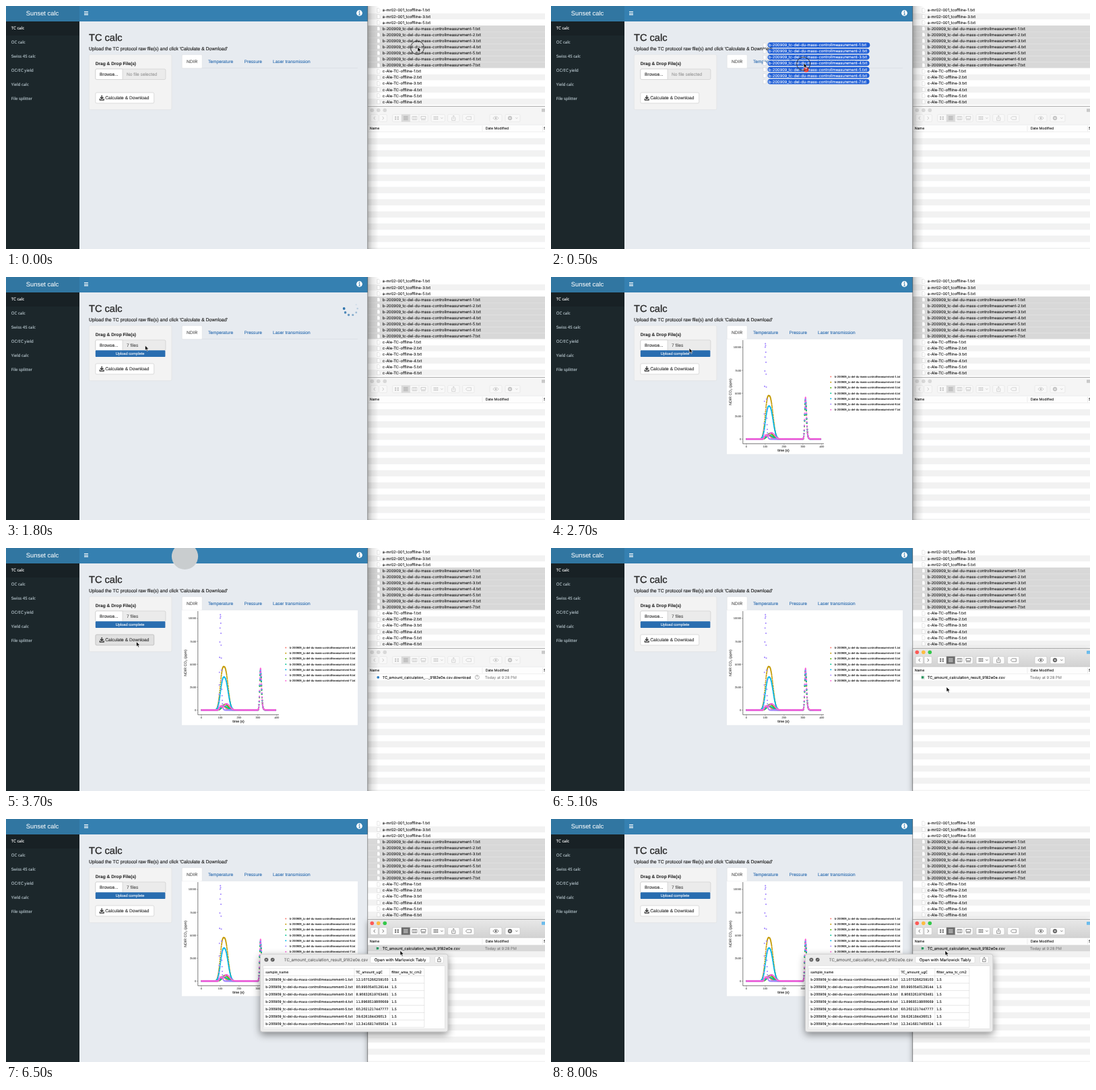
These frames come from a looping animation (800x362 px, 8100 ms). An HTML page:

```html
<!DOCTYPE html>
<html lang="en">
<head>
<meta charset="utf-8">
<title>TC calc demo</title>
<style>
html, body { margin: 0; width: 100%; height: 100%; overflow: hidden; background: #e7ebf0; }
svg { display: block; width: 100%; height: 100%; }
text { font-family: "Liberation Sans", Arial, sans-serif; text-rendering: geometricPrecision; white-space: pre; }
.mac { font-family: Inter, Roboto, sans-serif; }
.nav { font-family: "Noto Sans", "Open Sans", sans-serif; }
.tbl { font-family: "DejaVu Sans", sans-serif; }
.bold { font-weight: 700; }
.mid { text-anchor: middle; }
.end { text-anchor: end; }
</style>
</head>
<body>
<svg id="stage" viewBox="0 0 800 362" xmlns="http://www.w3.org/2000/svg"></svg>
<script>
const LOOP = 8100, STEP = 100, ROW = 9.08, STRIPE = '#f2f2f2';
const rect = (x, y, w, h, fill, more = '') =>
  `<rect x="${x}" y="${y}" width="${w}" height="${h}" fill="${fill}" ${more}/>`;
const disc = (x, y, r, fill, more = '') =>
  `<circle cx="${x}" cy="${y}" r="${r}" fill="${fill}" ${more}/>`;
const line = (d, color, w = .5, more = '') =>
  `<path d="${d}" fill="none" stroke="${color}" stroke-width="${w}" ${more}/>`;
// y is the middle of the capitals; a thin stroke gives the heavier desktop look
const text = (x, y, s, size, fill, cls = '', weight = .1) =>
  `<text x="${x}" y="${y + size * .36}" font-size="${size}" fill="${fill}" class="${cls}" stroke="${fill}" stroke-width="${weight}">${s.replace(/&/g, '&amp;')}</text>`;
const group = (id, body) => `<g id="${id}">${body}</g>`;
const range = (n, f) => Array.from({ length: n }, (_, i) => f(i)).join('');
const sample = i => `b-200909_tc-del-du-mass-controllmeasurement-${i + 1}.txt`;
const result = 'TC_amount_calculation_result_9182e0e.csv';

function page() {
  const nav = ['TC calc', 'OC calc', 'Swiss 4S calc', 'OC/EC yield', 'Yield calc', 'File splitter'];
  const tabs = [[300, 'Temperature'], [353.5, 'Pressure'], [396, 'Laser transmission']];
  return rect(0, 0, 537, 362, '#e7ebf0') +
    rect(0, 0, 109, 362, '#1c272b') +
    rect(0, 23, 109, 21, '#182125') +
    rect(109, 0, 428, 23, '#3580b1') + rect(0, 0, 109, 23, '#3176a1') +
    text(54, 10.8, 'Sunset calc', 9.4, '#fff', 'mid', .05) +
    nav.map((s, i) => text(7.8, 33.2 + 21.02 * i, s, 6.05, i ? '#b8c7ce' : '#fff', 'nav', .12)).join('') +
    line('M116 8.5h6M116 10.7h6M116 12.9h6', '#fff', 1.1) +
    disc(524.5, 10.5, 4.4, '#fff') + line('M523.5 9.8h1.3v3M523.3 13h2.6', '#3580b1', 1) + disc(524.5, 7.9, .8, '#3580b1') +
    text(123, 47, 'TC calc', 14.6, '#2b2b2b', '', .35) +
    text(123, 63.7, "Upload the TC protocol raw file(s) and click 'Calculate & Download'", 6.97, '#2b2b2b', '', .2) +
    rect(123.3, 72.3, 122.6, 82.2, '#f3f3f3', 'rx="1.8" stroke="#dedfe1" stroke-width=".6"') +
    text(132.7, 86.1, 'Drag & Drop File(s)', 6.63, '#2b2b2b', 'bold') +
    group('glow', rect(132.6, 93.6, 104.6, 16.2, 'none', 'rx="2" stroke="#4a8f4a" stroke-width="1.6" opacity=".5"')) +
    rect(132.9, 93.9, 104, 15.6, '#ebebeb', 'rx="1.8" stroke="#c8c8c8" stroke-width=".6"') +
    `<path d="M173 93.9H134.7a1.8 1.8 0 0 0-1.8 1.8v12a1.8 1.8 0 0 0 1.8 1.8H173Z" fill="#fff" stroke="#c8c8c8" stroke-width=".6"/>` +
    text(139, 101.6, 'Browse...', 6.63, '#2b2b2b') +
    group('noFile', text(179, 101.6, 'No file selected', 6.63, '#999')) +
    group('files', text(179, 101.6, '7 files', 6.63, '#505050')) +
    group('upload', rect(132.8, 109.3, 103.6, 9.8, '#f5f5f5', 'rx="1.8"') +
      rect(132.8, 109.3, 103.6, 9.8, '#296db0', 'rx="1.2" id="bar"') +
      group('done', text(184, 114, 'Upload complete', 5.7, '#fff', 'mid'))) +
    rect(132.9, 129, 86.8, 15.8, '#fff', 'rx="1.8" stroke="#c8c8c8" stroke-width=".6" id="calc"') +
    line('M142.2 133v4.6M139.9 135.8l2.3 2.4 2.3-2.4', '#333', 1.3) +
    line('M139.4 138.1v2h5.7v-2', '#333', 1.3) +
    text(147.2, 136.9, 'Calculate & Download', 6.63, '#2b2b2b') +
    line('M261 92.4H522', '#d5d9dd', .6) +
    rect(261.2, 72.4, 30, 20.4, '#fff', 'rx="1.6" stroke="#d8dbdf" stroke-width=".5"') +
    text(268, 82.3, 'NDIR', 6.63, '#505050') +
    tabs.map(([x, s]) => text(x, 82.3, s, 6.63, '#2b6cb0')).join('') +
    group('spinner', range(10, i =>
      disc(-10 * Math.cos(i * .628), 10 * Math.sin(i * .628), 1.9 - i * .12, '#2f74ad', `opacity="${Math.max(0, 1 - i * .15)}"`)));
}

// CO2 signal of each run: [first peak height, centre, width, power, second peak height]
const runs = [
  ['#F8766D', 480, 112, 18, 2, 4150], ['#C49A00', 4740, 119, 23, 2.6, 4300],
  ['#53B400', 620, 126, 20, 2, 4200], ['#00C094', 420, 121, 22, 2, 4250],
  ['#00B6EB', 3600, 120, 23, 2.4, 4350], ['#A58AFF', 10250, 101, 5.2, 2, 4420],
  ['#FB61D7', 680, 133, 20, 2, 4540]
];
function plot() {
  const px = t => 290 + t * .2795, py = v => 241.5 - v * .01366;
  const dots = runs.map(([color, high, mid, wide, power, high2], i) => {
    let d = '';
    for (let t = 0; t <= 394; t++) {
      const late = t > mid ? 1.2 : 1;
      let v = high * Math.exp(-(Math.abs((t - mid) / wide / late) ** power));
      if (i === 5) v += 300 * Math.exp(-(((t - 108) / 9) ** 2));
      if (i === 6) v += 380 * Math.exp(-(((t - 102) / 8) ** 2));
      v += high2 * Math.exp(-(((t - 313.8) / (t < 313.8 ? 5.5 : 7.5)) ** 2));
      v += 170 * Math.exp(-Math.abs(t - 326) / 6) + 12 * Math.sin(t * 2.3 + i);
      d += `M${px(t).toFixed(1)} ${py(v).toFixed(1)}h0`;
    }
    return line(d, color, 2.1, 'stroke-linecap="round"');
  }).join('');
  const ticks = range(5, i => {
    const y = py(i * 2500), x = px(i * 100);
    return text(282.2, y, String(i * 2500), 4.1, '#4d4d4d', 'end') + line(`M283.2 ${y}h1.6`, '#333', .4) +
      text(x, 252.5, String(i * 100), 4.1, '#4d4d4d', 'mid') + line(`M${x} 248.4v1.5`, '#333', .4);
  });
  return rect(261, 92.6, 261, 171.2, '#fff') + ticks + line('M284.8 94V248.4H405', '#222', .6) + dots +
    text(345, 258.2, 'time (s)', 5.2, '#111', 'mid') +
    `<g transform="translate(266.3 171) rotate(-90)"><text class="mid" y="1.9" font-size="5.3" fill="#111">NDIR CO<tspan font-size="3.7" dy="1">2</tspan><tspan dy="-1"> (ppm)</tspan></text></g>` +
    runs.map((r, i) => disc(415.3, 148.6 + 8.18 * i, 1, r[0]) + text(421, 148.6 + 8.18 * i, sample(i), 4.2, '#111')).join('');
}

const sheet = (x, y) => `<path d="M${x - 2} ${y - 3}h2.7l1.5 1.5v4.6h-4.2Z" fill="#fff" stroke="#c4c4c4" stroke-width=".4"/>`;
function fileList() {
  const names = [1, 3, 5].map(n => `a-mr02-001_tcoffline-${n}.txt`)
    .concat([0, 1, 2, 3, 4, 5, 6].map(sample), [1, 2, 3, 4, 5, 6].map(n => `c-Ale-TC-offline-${n}.txt`));
  return rect(537, 0, 263, 150, '#fff') + names.map((s, i) => {
    const y = 6.4 + ROW * i, picked = i > 2 && i < 10;
    return rect(537, y - ROW / 2, 263, ROW, picked ? '#d8d8d8' : i % 2 ? STRIPE : '#fff') +
      sheet(552.8, y) + text(558.7, y, s, 5.73, '#1a1a1a', 'mac');
  }).join('');
}

function chrome(active) {
  const ink = active ? '#555' : '#bdbdbd', edge = active ? '#bbb' : '#dedede';
  const lights = active ? ['#fc5b57', '#fdbc40', '#34c84a'] : Array(3).fill('#d8d8d8');
  const buttons = [[541, 11.4], [554, 11.4], [573.6, 52.6], [631, 20.4], [655.6, 17.4], [677.6, 17.4], [718, 18], [741, 22]];
  const mark = (d, w = .8) => line(d, ink, w);
  return rect(537, 149.8, 263, 27.4, active ? 'url(#bar-on)' : '#f5f5f5') +
    line('M537 177.2H800', active ? '#b4b4b4' : '#d8d8d8') +
    lights.map((c, i) => disc(543.3 + 9.5 * i, 155.2, 2.8, c)).join('') +
    rect(795, 153, 6, 4.8, active ? '#6cbcec' : '#c9c9c9', 'rx=".6"') +
    buttons.map(([x, w]) => rect(x, 161.5, w, 11, active ? '#fbfbfb' : '#f8f8f8', `rx="1.8" stroke="${edge}" stroke-width=".5"`)).join('') +
    rect(586.8, 161.5, 13, 11, active ? '#6b6b6b' : '#dadada') +
    line('M599.8 161.5v11M613 161.5v11', edge) +
    mark('M547.8 164.7l-2 2.3 2 2.3M558.7 164.7l2 2.3-2 2.3') +
    mark('M577.2 165.6h2M580.8 165.6h2M577.2 168.6h2M580.8 168.6h2', 2) +
    line('M590 164.6h6.6M590 166.2h6.6M590 167.8h6.6M590 169.4h6.6', active ? '#fff' : '#999', .6) +
    mark('M603 164.5h6.8v5H603ZM605.3 164.5v5M607.6 164.5v5', .6) +
    mark('M616 164.5h6.8v3.4H616ZM616 169.6h6.8', .7) +
    mark('M634.8 165.4h1.6M637.2 165.4h1.6M639.6 165.4h1.6M634.8 168.4h1.6M637.2 168.4h1.6M639.6 168.4h1.6', 1.7) +
    mark('M645.4 166.2l1.5 1.5 1.5-1.5') +
    mark('M663 166.2h-1.3v4.2h5.2v-4.2h-1.3M664.3 168.4v-5.2M662.8 164.6l1.5-1.5 1.5 1.5', .6) +
    mark('M682.4 167l2-2.2h6v4.4h-6Z', .6) +
    mark('M722.8 167q4.2-5 8.4 0q-4.2 5-8.4 0Z', .7) + disc(727, 167, 1.3, ink) +
    disc(748, 167, 2.2, 'none', `stroke="${ink}" stroke-width="1.4"`) +
    line('M748 163.6v6.8M744.6 167h6.8M745.6 164.6l4.8 4.8M750.4 164.6l-4.8 4.8', ink, .7) +
    disc(748, 167, .9, '#f8f8f8') + mark('M756.4 166.2l1.5 1.5 1.5-1.5');
}

function finder() {
  const y = 192.5;
  const date = fill => text(711, y, 'Today at 9:28 PM', 5.65, fill, 'mac');
  return group('lift', rect(537, 149.5, 263, 213, '#fff', 'filter="url(#edge)"')) +
    group('idle', chrome(false)) + group('front', chrome(true)) +
    rect(537, 177.4, 263, 10.6, '#fdfdfd') + line('M537 187.8H800M707 178.5v8M796.5 178.5v8', '#d8d8d8') +
    text(539.8, 182.2, 'Name', 5.2, '#1a1a1a', 'mac') + text(711.7, 182.2, 'Date Modified', 5.2, '#1a1a1a', 'mac') + text(798, 182.2, 'S', 5.2, '#1a1a1a', 'mac') +
    range(20, i => rect(537, 188 + ROW * i, 263, ROW, i % 2 ? STRIPE : '#fff')) +
    group('loading', disc(552.3, y + .2, 1.9, '#2f7fc4') +
      text(558.7, y, 'TC_amount_calculation_..._9182e0e.csv.download', 5.6, '#1a1a1a', 'mac') +
      disc(699.3, y, 3, 'none', 'stroke="#888" stroke-width=".6"') + line('M699.3 189.6v2.9', '#888', .7) + date('#8a8a8a')) +
    group('blue', rect(537, 188, 263, ROW, '#1f5fd4')) + group('grey', rect(537, 188, 263, ROW, '#d8d8d8')) +
    group('saved', sheet(552.3, y) + rect(549.8, y - 1.6, 3.6, 3.6, '#2b9560')) +
    group('savedText', text(558.7, y, result, 5.65, '#1a1a1a', 'mac') + date('#808080')) +
    group('savedLight', text(558.7, y, result, 5.65, '#fff', 'mac') + date('#fff'));
}

function preview() {
  const values = ['12.1075266259103', '80.9950540129144', '8.90832619763481', '11.8968519800669', '60.2021217447777', '39.626184436013', '12.3416817405024'];
  const rows = [['sample_name', 'TC_amount_ugC', 'filter_area_tc_cm2'], ...values.map((v, i) => [sample(i), v, '1.5'])];
  const pitch = 10.98, top = 222.6;
  return rect(377.3, 201.2, 278.6, 115.8, '#ececec', 'rx="3" stroke="#aaa" stroke-width=".5" filter="url(#drop)"') +
    disc(386.4, 209.6, 2.9, '#5a5a5a') + line('M385.2 208.4l2.4 2.4M387.6 208.4l-2.4 2.4', '#eee', .7) +
    disc(395.7, 209.6, 2.9, '#5a5a5a') + line('M394.5 210.8l2.4-2.4', '#eee', .8) +
    text(412.8, 209.7, result, 6.1, '#666', 'mac') +
    rect(541, 204.7, 88, 9.9, '#fff', 'rx="1.7" stroke="#c6c6c6" stroke-width=".4"') +
    text(585, 209.6, 'Open with Marlowick Tably', 6, '#1a1a1a', 'mac mid') +
    rect(636.6, 204.7, 12.6, 9.9, '#fff', 'rx="1.7" stroke="#c6c6c6" stroke-width=".4"') +
    line('M641.8 208.6h-1.2v4h4.6v-4H644M642.9 210.6v-4.6M641.6 207.2l1.3-1.3 1.3 1.3', '#444', .6) +
    rect(381.8, 218.8, 269.4, 93.6, '#fff', 'stroke="#d2d2d2" stroke-width=".4"') +
    range(9, i => line(`M382.6 ${top + pitch * i}H620.8`, '#c4c4c4', .4)) +
    [382.6, 517, 569.8, 620.8].map(x => line(`M${x} ${top}v${pitch * 8}`, '#c4c4c4', .4)).join('') +
    rows.map((row, i) => row.map((s, j) =>
      text([385.2, 519.6, 572.2][j], top + pitch * (i + .5), s, 4.88, '#111', 'tbl')).join('')).join('');
}

const dragged = () => range(7, i => {
  const y = 33.65 + ROW * i;
  return sheet(552.8, y) + rect(557.4, y - 3.8, i ? 151 : 151.8, 7.6, '#205fd6', 'rx="3.8"') + text(558.9, y, sample(i), 5.73, '#fff', 'mac');
}) + disc(614.6, 70.4, 3.6, '#f0362f') + text(614.6, 70.4, '7', 5, '#fff', 'mac mid');

const stage = document.getElementById('stage');
stage.innerHTML = `<defs>
  <linearGradient id="bar-on" x2="0" y2="1"><stop stop-color="#e8e8e8"/><stop offset="1" stop-color="#d2d2d2"/></linearGradient>
  <linearGradient id="side"><stop stop-opacity=".26"/><stop offset=".4" stop-opacity=".1"/><stop offset="1" stop-opacity="0"/></linearGradient>
  <filter id="drop" x="-10%" y="-20%" width="120%" height="145%"><feDropShadow dx="0" dy="4" stdDeviation="6" flood-opacity=".45"/></filter>
  <filter id="edge" x="-10%" y="-10%" width="120%" height="120%"><feDropShadow dx="0" dy="3" stdDeviation="4.5" flood-opacity=".4"/></filter>
</defs>` + page() + group('plot', plot()) + fileList() + finder() +
  group('shade', rect(537, 0, 16, 362, 'url(#side)')) +
  line('M536.7 0V362', '#555', .6) + line('M537 149.5H800', '#777', .6) +
  group('preview', preview()) + group('drag', dragged()) +
  group('flyer', disc(0, 0, 19.6, '#c9cdcf')) +
  group('pointer', disc(-.5, 1.2, 10, 'none', 'id="ring" stroke="#333" stroke-width=".9"') +
    '<path d="M0 0V7.2L1.7 5.7L2.9 8.4L4.1 7.9L3 5.3H5.2Z" fill="#000" stroke="#fff" stroke-width=".6"/>');

const el = {};
stage.querySelectorAll('[id]').forEach(n => el[n.id] = n);
const show = (id, on) => el[id].setAttribute('visibility', on ? 'inherit' : 'hidden');
const move = (id, x, y, more = '') => el[id].setAttribute('transform', `translate(${x} ${y}) ${more}`);
const part = (t, a, b) => Math.min(1, Math.max(0, (t - a) / (b - a)));
const ease = u => u * u * (3 - 2 * u);
const mix = (a, b, u) => a + (b - a) * u;

const path = [
  [0, 611, 61], [900, 206.5, 102], [2600, 206.5, 102], [3100, 193.5, 139.6],
  [3800, 193.5, 139.6], [4600, 587, 207], [5300, 587, 207], [5700, 585, 196], [LOOP, 585, 196]
];
function pointerAt(t) {
  const i = path.findIndex((p, k) => k && t <= p[0]);
  const a = path[i - 1], b = path[i], u = ease(part(t, a[0], b[0]));
  return [mix(a[1], b[1], u), mix(a[2], b[2], u)];
}

function draw(t) {
  const during = (a, b = LOOP) => t >= a && t < b;
  const [x, y] = pointerAt(t);
  move('pointer', x, y);
  show('ring', during(0, 1000) || during(3200, 3500) || during(4600, 4800) || during(5700, 5900));
  move('drag', x - 611, y - 60.4);
  show('drag', during(100, 1100));
  show('glow', during(800, 1100));

  show('noFile', t < 1100);
  show('files', t >= 1100);
  show('upload', t >= 1200);
  el.bar.setAttribute('width', 103.6 * part(t, 1100, 1400));
  show('done', t >= 1400);
  show('spinner', during(1300, 2600));
  move('spinner', 511.7, 47, `rotate(${(t - 1800) * .36})`);
  show('plot', t >= 2600);

  const hover = during(2900, 4000);
  el.calc.setAttribute('fill', hover ? '#e0e0e0' : '#fff');
  el.calc.setAttribute('stroke', hover ? '#a9a9a9' : '#c8c8c8');
  const fly = (t - 3400) / 300;
  show('flyer', during(3400, 3900));
  move('flyer', mix(194, 265.5, fly), mix(138, 12.5, fly));

  const front = t >= 4700, blue = during(5700, 6100);
  show('idle', !front);
  show('shade', !front);
  show('front', front);
  show('lift', front);
  show('loading', during(3500, 4300));
  show('saved', t >= 4300);
  show('savedText', t >= 4300 && !blue);
  show('savedLight', blue);
  show('blue', blue);
  show('grey', t >= 6100);

  // the preview grows out of the selected row
  const open = part(t, 6000, 6400), zoom = mix(.12, 1, ease(open));
  show('preview', t >= 6100);
  move('preview', mix(553, 516.6, open) - 516.6 * zoom, mix(192.5, 259, open) - 259 * zoom, `scale(${zoom})`);
  el.preview.setAttribute('opacity', mix(.4, 1, open));
}

function tick(now) {
  draw(Math.floor((now % LOOP) / STEP) * STEP);
  requestAnimationFrame(tick);
}
draw(0);
requestAnimationFrame(tick);
</script>
</body>
</html>
```
